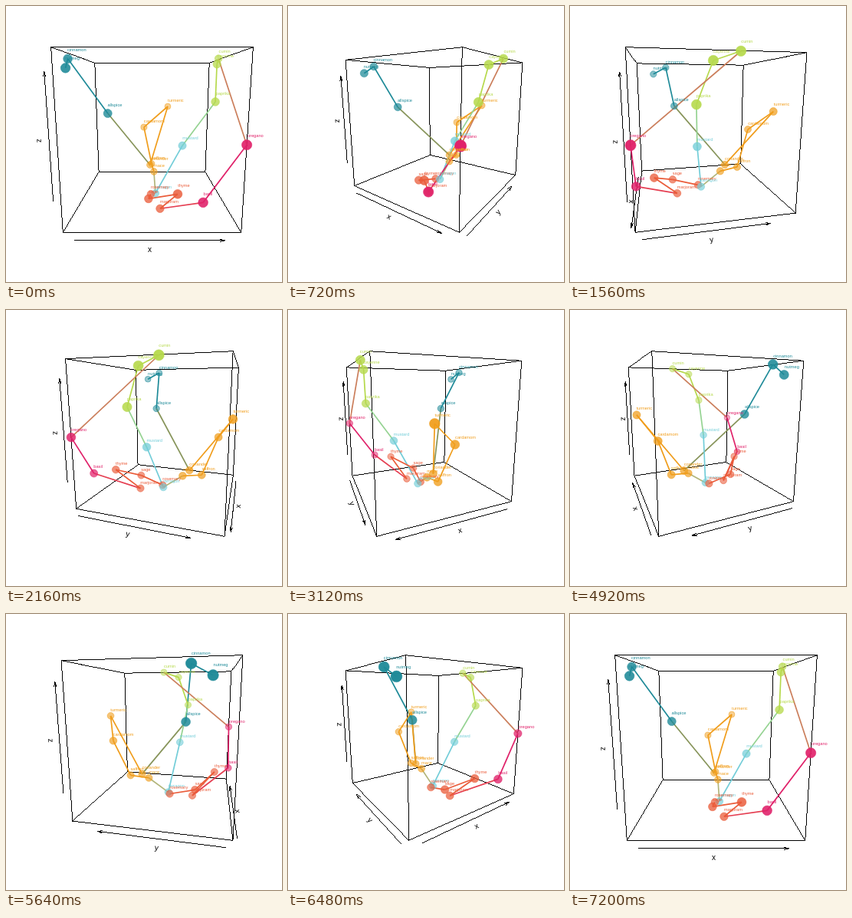
An HTML page with a canvas that plays this animation: 360 px wide and 360 px high, repeating every 7.32 s.

```html
<!DOCTYPE html>
<html lang="en">
<head>
<meta charset="utf-8">
<title>Spices in 3D</title>
<style>
html, body { margin: 0; width: 100%; height: 100%; overflow: hidden; background: #fff; }
canvas { display: block; width: 360px; height: 360px; }
</style>
</head>
<body>
<canvas id="plot" width="360" height="360"></canvas>
<script>
const ctx = document.getElementById('plot').getContext('2d');
const FRAME_MS = 120, FRAMES = 61, RAD = Math.PI / 180;
const EYE = 2 + Math.sqrt(3), SIN_PHI = Math.sin(10 * RAD), COS_PHI = Math.cos(10 * RAD);

const TEAL = [30, 138, 152], ORANGE = [240, 157, 28], BLUE = [115, 205, 216];
const GREEN = [182, 217, 76], PINK = [224, 34, 106], RED = [234, 92, 58];

// Points in path order, inside the cube from -1 to 1.
const spices = [
  ['nutmeg', TEAL, -.959, -.719, .815],
  ['cinnamon', TEAL, -.998, -.495, .934],
  ['allspice', TEAL, -.561, -.395, .273],
  ['coriander', ORANGE, -.032, .357, -.647],
  ['turmeric', ORANGE, .282, 1, .239],
  ['cardamom', ORANGE, -.141, .78, -.102],
  ['saffron', ORANGE, -.008, .559, -.692],
  ['mace', ORANGE, .029, .263, -.727],
  ['tarragon', BLUE, .05, -.054, -.952],
  ['mustard', BLUE, .418, -.18, -.199],
  ['paprika', GREEN, .828, -.262, .41],
  ['cayenne', GREEN, .873, -.076, .902],
  ['cumin', GREEN, .962, .214, 1],
  ['oregano', PINK, 1, -1, .008],
  ['basil', PINK, .561, -1, -.642],
  ['marjoram', RED, .107, -.436, -1],
  ['thyme', RED, .304, -.771, -.645],
  ['sage', RED, -.046, -.489, -.835],
  ['rosemary', RED, -.018, -.09, -.948],
].map(([name, color, ...pos]) => ({ name, color, pos }));

const signs = [-1, 1];
const corners = signs.flatMap(z => signs.flatMap(y => signs.map(x => [x, y, z])));
const floor = corners.slice(0, 4);
const axisRange = [[-.853, .802], [-.918, .624], [-.595, .759]];

const rgb = (c, alpha = 1) => `rgba(${c},${alpha})`;
const mix = (a, b) => a.map((v, i) => Math.round((v + b[i]) / 2));

// Perspective view turned by theta, with the cube fitted to a fixed height.
function makeView(theta) {
  const s = Math.sin(theta), c = Math.cos(theta);
  const raw = ([x, y, z]) => {
    const near = x * s - y * c;
    const depth = EYE - near * COS_PHI - z * SIN_PHI;
    return { x: (x * c + y * s) / depth, y: (near * SIN_PHI - z * COS_PHI) / depth, depth };
  };
  const box = corners.map(raw), xs = box.map(p => p.x), ys = box.map(p => p.y);
  const [left, right, top, bottom] =
    [Math.min(...xs), Math.max(...xs), Math.min(...ys), Math.max(...ys)];
  const scale = 241.6 / (bottom - top);
  return pos => {
    const p = raw(pos);
    return {
      x: 190.5 + (p.x - (left + right) / 2) * scale,
      y: 174.5 + (p.y - (top + bottom) / 2) * scale,
      depth: p.depth
    };
  };
}

// Black hairline of whole pixels, without smoothing.
function hairline(a, b) {
  const dx = b.x - a.x, dy = b.y - a.y;
  const steps = Math.ceil(Math.max(Math.abs(dx), Math.abs(dy)));
  ctx.fillStyle = '#000';
  for (let i = 0; i <= steps; i++)
    ctx.fillRect(Math.floor(a.x + dx * i / steps), Math.floor(a.y + dy * i / steps), 1, 1);
}

function drawBox(view) {
  corners.forEach((from, i) => {
    for (const bit of [1, 2, 4])
      if (!(i & bit)) hairline(view(from), view(corners[i | bit]));
  });
}

// Arrow beside the cube edge that runs along `dim` through `corner`.
function drawAxis(view, dim, corner) {
  const at = (value, gap) => {
    const pos = corner.map(v => v * (1 + gap));
    pos[dim] = value;
    return view(pos);
  };
  const [min, max] = axisRange[dim];
  const a = at(min, .06), b = at(max, .06), label = at((min + max) / 2, .13);
  const angle = Math.atan2(b.y - a.y, b.x - a.x);
  hairline(a, b);
  for (const turn of [-14, 14]) {
    const dir = angle + turn * RAD;
    hairline(b, { x: b.x - 6 * Math.cos(dir), y: b.y - 6 * Math.sin(dir) });
  }
  ctx.save();
  ctx.translate(label.x, label.y);
  ctx.rotate(Math.atan((b.y - a.y) / (b.x - a.x)));
  ctx.font = '10px "Liberation Sans", sans-serif';
  ctx.textAlign = 'center';
  ctx.fillText('xyz'[dim], 0, 0);
  ctx.restore();
}

function drawAxes(view, theta) {
  const pick = score => floor.reduce((best, c) => score(view(c)) > score(view(best)) + 1e-6 ? c : best);
  const lowest = pick(p => p.y), leftmost = pick(p => -p.x);
  drawAxis(view, 0, lowest);
  if (theta) drawAxis(view, 1, lowest);
  drawAxis(view, 2, leftmost);
}

function drawSpices(view) {
  const items = spices.map(s => ({ ...s, ...view(s.pos) }));
  ctx.lineWidth = 1.7;
  items.slice(1).forEach((b, i) => {
    const a = items[i];
    ctx.strokeStyle = rgb(mix(a.color, b.color));
    ctx.beginPath();
    ctx.moveTo(a.x, a.y);
    ctx.lineTo(b.x, b.y);
    ctx.stroke();
  });
  items.sort((a, b) => b.depth - a.depth);
  ctx.lineWidth = 1;
  for (const p of items) {
    ctx.fillStyle = rgb(p.color, Math.min(1, 1.55 - .23 * p.depth));
    ctx.strokeStyle = rgb(p.color, .5);
    ctx.beginPath();
    ctx.arc(p.x, p.y, 18.2 / p.depth, 0, 2 * Math.PI);
    ctx.fill();
    ctx.stroke();
  }
  ctx.font = '5.7px "Liberation Sans", sans-serif';
  ctx.textAlign = 'left';
  for (const { name, color, pos: [x, y, z] } of items) {
    const p = view([x, y, z + .1]);
    ctx.fillStyle = rgb(color);
    ctx.fillText(name, p.x, p.y);
  }
}

function draw() {
  const step = Math.floor(performance.now() / FRAME_MS) % FRAMES;
  const theta = (step * 6 % 360) * RAD, view = makeView(theta);
  ctx.fillStyle = '#fff';
  ctx.fillRect(0, 0, 360, 360);
  ctx.textBaseline = 'middle';
  drawBox(view);
  drawAxes(view, theta);
  drawSpices(view);
  requestAnimationFrame(draw);
}
draw();
</script>
</body>
</html>
```
